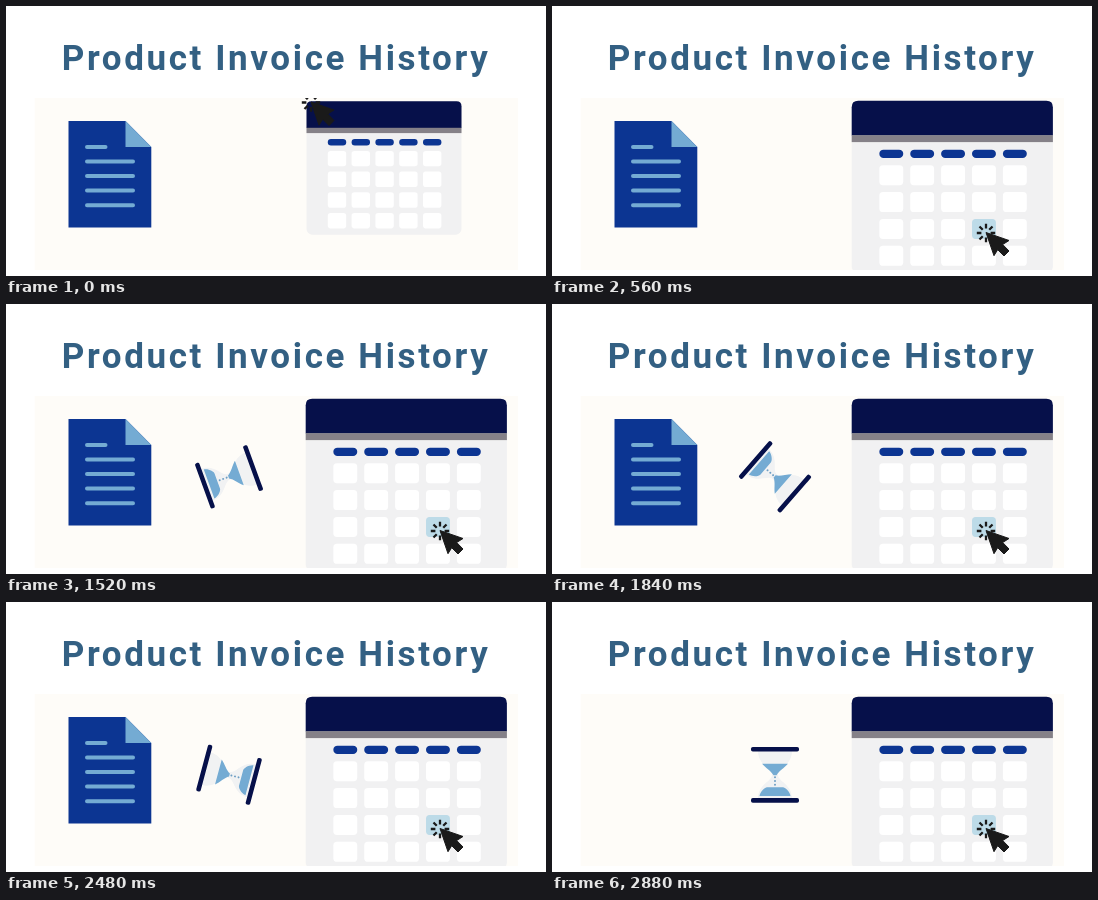
Recreate the animation shown at these times as an HTML page. Size 540x270 px, loop 3.68 s.

```html
<!DOCTYPE html>
<html lang="en">
<head>
<meta charset="utf-8">
<title>Product Invoice History</title>
<style>
  html, body { margin: 0; width: 100%; height: 100%; overflow: hidden; background: #fff; }
  svg { display: block; width: 540px; height: 270px; }
  .title { font: 700 35px Roboto, "Open Sans", sans-serif; letter-spacing: 2.6px; fill: #336083; }
  .navy { fill: #06104a; }
  .blue { fill: #0c3592; }
  .sky { fill: #74abd3; }
  .lines { stroke: #74abd3; stroke-width: 4; stroke-linecap: round; }
</style>
</head>
<body>
<svg viewBox="0 0 540 270">
  <clipPath id="panel"><rect x="28.5" y="92" width="483.5" height="172"/></clipPath>
  <text class="title" x="55.8" y="64.4">Product Invoice History</text>
  <g clip-path="url(#panel)">
    <rect x="28.5" y="92" width="483.5" height="172" fill="#fefcf8"/>

    <g id="invoice">
      <path class="blue" d="M62.5 114.9H119.5L145.3 141V221.6H62.5Z"/>
      <path class="sky" d="M119.5 114.9L145.3 141H119.5Z"/>
      <path class="lines" d="M81 141H99.5M81 155.5H127M81 170H127M81 184.6H127M81 199.2H127"/>
    </g>

    <g id="hourglass">
      <path fill="#f1f2f3" d="M-17-24C-17-9-3-7-3 0C-3 7-17 9-17 24H17C17 9 3 7 3 0C3-7 17-9 17-24Z"/>
      <path class="sky" d="M-13-11H13C9-6.5 4-4 1.5 .5H-1.5C-4-4-9-6.5-13-11Z"/>
      <path class="sky" d="M-15.5 21.2C-14.5 16-10 12.5-8 12.5H8C10 12.5 14.5 16 15.5 21.2Z"/>
      <path d="M0 2.5V10" stroke="#6f9fc4" stroke-width="2" stroke-linecap="round" stroke-dasharray="0 3.7"/>
      <rect class="navy" x="-24" y="-27.9" width="48" height="4.6" rx="1.8"/>
      <rect class="navy" x="-24" y="23.3" width="48" height="4.6" rx="1.8"/>
    </g>

    <g id="calendar">
      <rect width="155" height="133.5" rx="6" fill="#f1f1f2"/>
      <path class="navy" d="M0 26.8V5Q0 0 5 0H150Q155 0 155 5V26.8Z"/>
      <rect y="26.6" width="155" height="5.3" fill="#858188"/>
      <g id="days"></g>
    </g>

    <g id="cursor" fill="#1a1a1a">
      <path d="M0-1L23 7L16.7 11L23 17.5L18 22.5L11.7 16.2L8 22.2Z" stroke="#1a1a1a" stroke-linejoin="round"/>
      <path id="rays" fill="none" stroke="#1a1a1a" stroke-width="2.3"/>
    </g>
  </g>
</svg>
<script>
const LOOP = 3680, STEP = 80;
const byId = id => document.getElementById(id);
const lerp = (a, b, k) => a + (b - a) * k;
const progress = (t, from, to) => Math.min(1, Math.max(0, (t - from) / (to - from)));
const show = (el, on) => el.setAttribute("visibility", on ? "visible" : "hidden");

const invoice = byId("invoice"), hourglass = byId("hourglass");
const calendar = byId("calendar"), cursor = byId("cursor");

// One full turn that speeds up: [time, degrees]
const turn = [[1120, 0], [1520, 70], [2160, 192], [2480, 285], [2720, 360]];

function angleAt(t) {
  let angle = 0;
  for (let i = 1; i < turn.length; i++) {
    const [from, a] = turn[i - 1], [to, b] = turn[i];
    angle += (b - a) * progress(t, from, to);
  }
  return angle;
}

function addBox(column, y, height, radius, fill) {
  const box = document.createElementNS("http://www.w3.org/2000/svg", "rect");
  const attrs = { x: 21.3 + 23.8 * column, y, width: 18.4, height, rx: radius, fill };
  for (const name in attrs) box.setAttribute(name, attrs[name]);
  byId("days").append(box);
  return box;
}

let pickedDay;
for (let column = 0; column < 5; column++) {
  addBox(column, 37.7, 6.5, 3.2, "#0c3592");
  for (let row = 0; row < 4; row++) {
    const day = addBox(column, 49.7 + 20.7 * row, 15.4, 2.8, "#fff");
    if (column === 3 && row === 2) pickedDay = day;
  }
}

// Click burst, open towards the arrow body
byId("rays").setAttribute("d", [90, 135, 180, 225, 270, 315, 360].map(deg => {
  const a = deg * Math.PI / 180;
  const at = r => `${r * Math.cos(a)} ${r * Math.sin(a) - 0.5}`;
  return `M${at(4.6)}L${at(9.2)}`;
}).join(""));

function draw(time) {
  const t = Math.floor(time % LOOP / STEP) * STEP;

  const zoom = progress(t, 0, 320);
  calendar.setAttribute("transform",
    `translate(${lerp(300.5, 299.7, zoom)} ${lerp(95.2, 94.7, zoom)}) scale(${lerp(1, 1.298, zoom)})`);

  const move = progress(t, 400, 560);
  cursor.setAttribute("transform", `translate(${lerp(305, 434, move)} ${lerp(97, 227.5, move)})`);
  pickedDay.setAttribute("fill", t >= 560 ? "#bddbe8" : "#fff");

  hourglass.setAttribute("transform", `translate(223 172.8) rotate(${angleAt(t)})`);
  show(hourglass, t >= 1120);
  show(invoice, t < 2880);
}

const start = performance.now();
function tick() {
  draw(performance.now() - start);
  requestAnimationFrame(tick);
}
tick();
</script>
</body>
</html>
```
